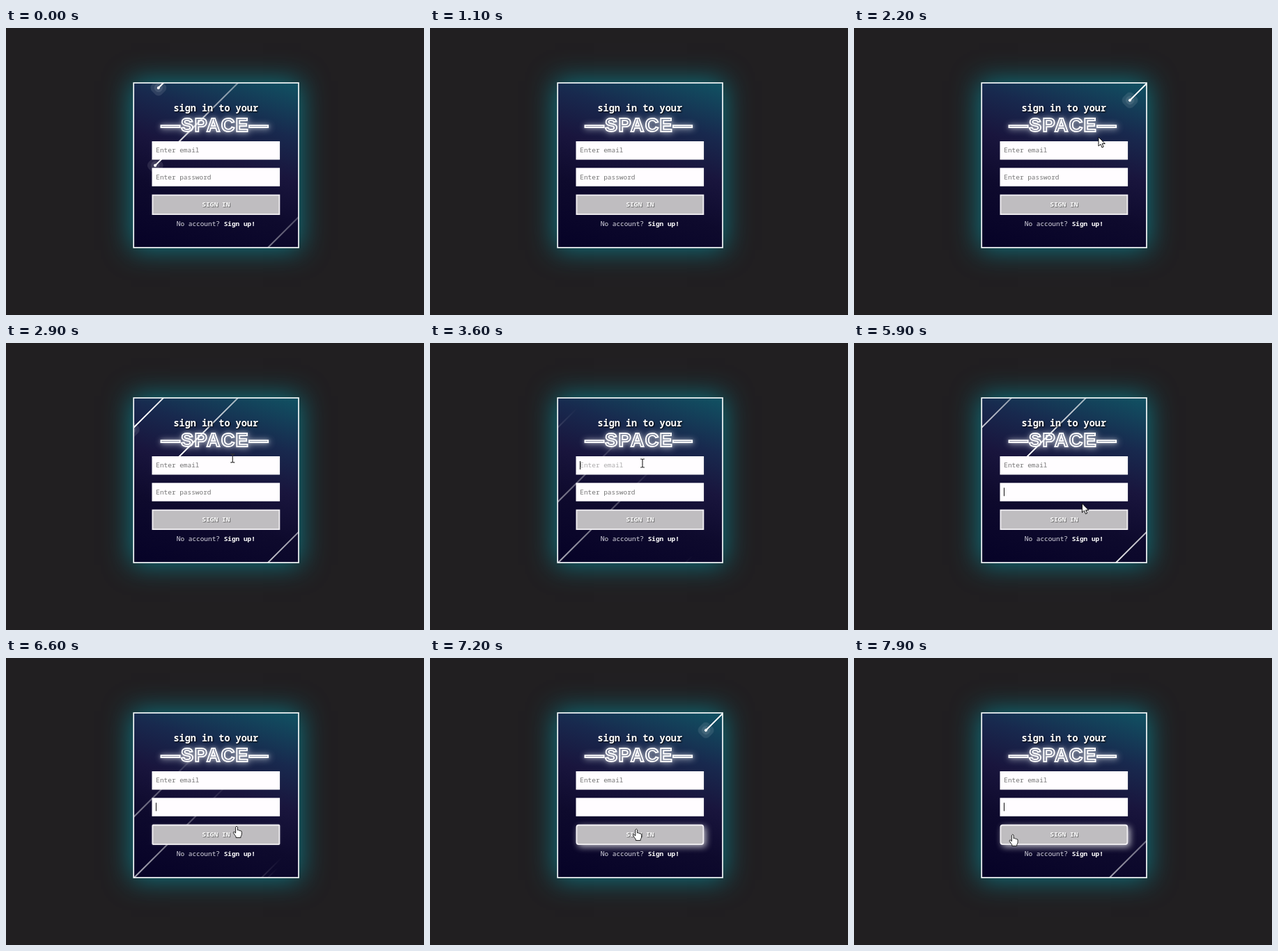
An HTML page for the animation above (8000 ms loop, 600 px wide and 413 px high).

```html
<!DOCTYPE html>
<html lang="en">
<head>
<meta charset="utf-8">
<title>Sign in</title>
<style>
html, body { margin: 0; width: 100%; height: 100%; overflow: hidden; background: #211f21; }
.card {
  position: absolute; left: 183px; top: 79px; width: 237px; height: 237px; overflow: hidden;
  background: linear-gradient(197deg, #114f61 2%, #18294e 26%, #19153d 46%, #0e0a2d 68%, #060227 100%);
  box-shadow: 0 0 36px 3px #0d7480;
}
.star {
  position: absolute; width: 4px; height: 4px; border-radius: 50%; background: #fff;
  box-shadow: 0 0 0 4px rgba(255, 255, 255, .1), 0 0 0 8px rgba(255, 255, 255, .1), 0 0 20px rgba(255, 255, 255, .1);
}
.star::before {
  content: ""; position: absolute; top: 1.4px; left: 0; width: 300px; height: 1.2px;
  background: linear-gradient(90deg, #fff, transparent);
}
svg { position: absolute; left: 0; top: 0; }
text { font: 9.43px "Noto Sans Mono", "DejaVu Sans Mono", monospace; white-space: pre; }
.bold { font-weight: 700; fill: #fff; }
.hint { fill: #757575; }
.head { font-size: 13.5px; text-shadow: 1px 1px 2px #000; }
.logo {
  font: 700 27.2px "Liberation Sans", Arial, sans-serif; letter-spacing: 1.25px;
  fill: none; stroke: #fff; stroke-width: 1.9px;
  filter: drop-shadow(0 0 2px rgba(255, 255, 255, .35)) drop-shadow(1px 1px 5px rgba(255, 255, 255, .7));
}
.label { font-size: 9.6px; font-weight: 600; fill: #fff; text-shadow: 1px 1px 1px #666; }
.field { fill: #fffdff; }
.pointer { fill: #fff; stroke: #111; stroke-width: 1; stroke-linejoin: round; }
</style>
</head>
<body>
<div class="card" id="card"></div>
<svg width="600" height="413" viewBox="0 0 600 413">
  <rect x="183.2" y="79" width="236.8" height="237" fill="none" stroke="#f4f8fa" stroke-width="1.7"/>
  <text class="bold head" x="240.5" y="120">sign in to your</text>
  <text class="logo" x="222.6" y="148.9">—SPACE—</text>
  <rect class="field" x="209.5" y="163" width="183.6" height="26.5"/>
  <rect class="field" x="209.5" y="201.3" width="183.6" height="26.5"/>
  <text class="hint" id="email" x="215.3" y="179.3">Enter email</text>
  <text class="hint" id="password" x="215.3" y="217.6">Enter password</text>
  <path id="caret" stroke="#111" d="M0 0v12"/>
  <rect id="button" x="210.4" y="240.5" width="182" height="27.6" fill="#bfbdc0" stroke="#f3f1f4" stroke-width="1.8"/>
  <text class="label" x="281.3" y="257.2">SIGN IN</text>
  <text x="244.8" y="285" fill="#dddce6">No account? <tspan class="bold">Sign up!</tspan></text>
  <g id="cursor">
    <path class="pointer" d="M0 0V13L3 10.2L5 15L7.2 14L5.2 9.5H9.3Z"/>
    <path fill="none" stroke="#333" stroke-width="1.2" d="M-3 -6H-1L0 -5L1 -6H3M0 -5V5M-3 6H-1L0 5L1 6H3"/>
    <path class="pointer" transform="scale(.92)" d="M-1.5 1.4Q0-1.2 1.5 1.4V6.3Q3.2 5.3 4 6.9Q5.7 6 6.2 7.6Q8 7 8 9.3V12Q8 14.5 6.5 16.2V18H-1V16.3Q-3 13.5-5 10.5Q-5.2 8.6-3.4 9L-1.5 10.8Z"/>
  </g>
</svg>
<script>
const LOOP = 8000, EMAIL_CLICK = 3500, PASSWORD_CLICK = 5500, HOVER = 6500;
const $ = id => document.getElementById(id);
const clamp = v => Math.max(0, Math.min(1, v));
const ease = u => u * u * (3 - 2 * u);

// lane: distance from the top right corner, left along the top if negative, else down the side
const stars = [
  { lane: 0, period: 1000, age: 830 },
  { lane: -88, period: 3000, age: 490 },
  { lane: -195, period: 2750, age: 15 },
  { lane: 192, period: 3120, age: 690 },
  { lane: 182.5, period: 1520, age: 1500 }
];
for (const star of stars) {
  star.el = document.createElement("i");
  star.el.className = "star";
  star.el.style.left = 233 + Math.min(star.lane, 0) + "px";
  star.el.style.top = 1 + Math.max(star.lane, 0) + "px";
  $("card").append(star.el);
}

// The cursor glides from stop to stop, resting briefly at each.
const stops = [[350, -200], [351, 157], [305, 173], [323, 217], [331, 242], [226, 254]];
const DEPART = 700, LEG = 1500, TRAVEL = 1300;

function cursorAt(t) {
  const time = Math.max(0, t - DEPART);
  const leg = Math.floor(time / LEG);
  const u = ease(clamp(time % LEG / TRAVEL));
  return stops[leg].map((v, axis) => v + (stops[leg + 1][axis] - v) * u);
}

function drawStars(t) {
  for (const { el, period, age } of stars) {
    const p = (t + age) / period % 1;
    el.style.transform = `rotate(315deg) translateX(${-1000 * p}px)`;
    el.style.opacity = clamp((1 - p) / .3);
  }
}

function drawForm(t) {
  const left = clamp((t - EMAIL_CLICK) / 250);
  const moved = clamp((t - PASSWORD_CLICK) / 250);
  $("email").style.opacity = 1 - left + moved;
  $("password").style.opacity = 1 - moved;

  const onPassword = t >= PASSWORD_CLICK;
  const since = t - (onPassword ? PASSWORD_CLICK : EMAIL_CLICK);
  $("caret").style.opacity = since >= 0 && since % 1000 < 500 ? 1 : 0;
  $("caret").setAttribute("transform", `translate(215.5 ${onPassword ? 208.3 : 170})`);

  const hover = clamp((t - HOVER) / 350);
  $("button").setAttribute("rx", 3 * hover);
  $("button").style.filter = hover
    ? `drop-shadow(${3 * hover}px ${3 * hover}px ${5 * hover}px rgba(255, 255, 255, ${.7 * hover}))`
    : "none";
}

function drawCursor(t) {
  const [x, y] = cursorAt(t);
  const inField = y > 163 && y < 189.5 || y > 201.3 && y < 227.8;
  const shape = inField ? 1 : y > 239 ? 2 : 0;
  $("cursor").setAttribute("transform", `translate(${x} ${y})`);
  [...$("cursor").children].forEach((el, i) => el.style.display = i === shape ? "" : "none");
}

const start = performance.now();
function frame() {
  const t = (performance.now() - start) % LOOP;
  drawStars(t);
  drawForm(t);
  drawCursor(t);
  requestAnimationFrame(frame);
}
frame();
</script>
</body>
</html>
```
